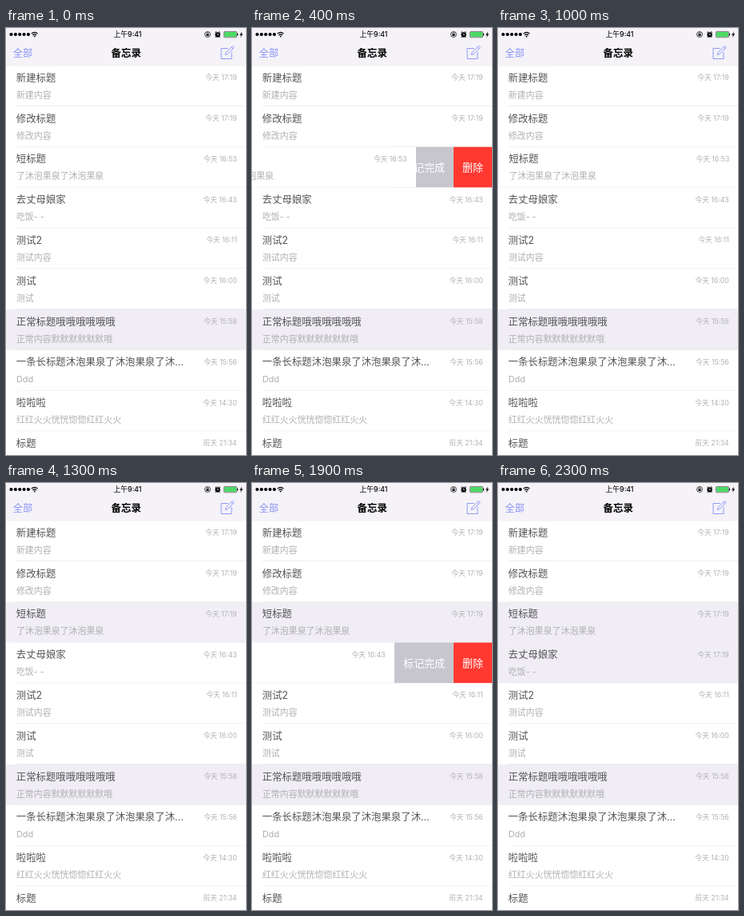
These frames come from a looping animation (300x534 px, 2400 ms). An HTML page:

```html
<!DOCTYPE html>
<html lang="zh-CN">
<head>
<meta charset="utf-8">
<title>备忘录</title>
<style>
  html, body { margin: 0; width: 100%; height: 100%; overflow: hidden; background: #fff; }
  svg { display: block; width: 100%; height: 100%; }
  text { font-family: Inter, "Noto Sans CJK SC", "Noto Sans CJK", sans-serif; }
  .title { font-size: 12.4px; fill: #555; }
  .body { font-size: 10.95px; fill: #b0b0b0; }
  .date { font-size: 8.7px; fill: #b2b2b2; text-anchor: end; }
  .button { font-size: 13px; fill: #fff; text-anchor: middle; }
  .icon { fill: none; stroke: #000; }
  .tint { fill: none; stroke: #8390f6; stroke-width: .9; }
</style>
</head>
<body>
<svg viewBox="0 0 300 534">
  <g id="list"></g>
  <rect width="300" height="47.7" fill="#f5f3f8"/>
  <g id="signal"></g>
  <g class="icon" stroke-width="1.2">
    <path d="M31.8 7.1Q35.7 3.5 39.6 7.1M33.4 9Q35.7 6.9 38 9"/>
    <circle cx="35.7" cy="10.4" r=".4"/>
  </g>
  <text x="152" y="11.3" font-size="8.8" font-weight="500" text-anchor="middle">上午9:41</text>
  <g class="icon" stroke-width=".7">
    <circle cx="252" cy="8" r="3.5"/>
    <path d="M250.9 7.6V6.8a1.1 1.1 0 0 1 2.2 0V7.6"/>
    <path d="M250.4 7.5h3.2v2.4h-3.2z" fill="#000" stroke="none"/>
    <circle cx="264.6" cy="8.4" r="2.9" fill="#000"/>
    <path d="M261.4 6l1.7-1.6M267.8 6l-1.7-1.6M262.8 10.6l-1 1.3M266.4 10.6l1 1.3" stroke-width="1"/>
    <path d="M264.6 6.8V8.6H266" stroke="#fff"/>
    <rect x="272.4" y="4.4" width="16.2" height="7.4" rx="1.3" stroke-width=".5"/>
    <rect x="273.1" y="5.1" width="14.8" height="6" rx=".6" fill="#4cd964" stroke="none"/>
    <path d="M289.5 6.8v2.6" stroke-width="1"/>
    <path d="M295 4.5l-3 4.2h1.9l-.9 3.3 3.2-4.4h-1.9z" fill="#000" stroke="none"/>
  </g>
  <text x="8.8" y="36" font-size="12.2" fill="#8793f7">全部</text>
  <text x="150.3" y="35.6" font-size="12.5" font-weight="700" text-anchor="middle">备忘录</text>
  <path class="tint" d="M277.5 25.5H269V38.5H282V30M274.3 33.5l.8-3L283.3 22.3l2 2L277.2 32.5zM281.7 24l2 2"/>
</svg>
<script>
const LOOP = 2400, TICK = 100, TOP = 47.2, ROW = 50.8;
const INK = "#e6e5e9", SHADE = "#f0edf5";

const notes = [
  ["新建标题", "新建内容", "今天 17:19"],
  ["修改标题", "修改内容", "今天 17:19"],
  ["短标题", "了沐泡果泉了沐泡果泉", "今天 16:53"],
  ["去丈母娘家", "吃饭- -", "今天 16:43"],
  ["测试2", "测试内容", "今天 16:11"],
  ["测试", "测试", "今天 16:00"],
  ["正常标题哦哦哦哦哦哦", "正常内容默默默默默默哦", "今天 15:58"],
  ["一条长标题沐泡果泉了沐泡果泉了沐...", "Ddd", "今天 15:56"],
  ["啦啦啦", "红红火火恍恍惚惚红红火火", "今天 14:30"],
  ["标题", "", "前天 21:34"],
];

// Per swiped row: first tick, offsets per tick, then fade-in of the done state.
const swipes = {
  2: { start: 3, slide: [-34, -95, -115, -121, -122, -122, -14, .6], fade: [.3, .65, .9, 1] },
  3: { start: 16, slide: [-63.5, -104, -118, -122, -14], fade: [.7, .9, 1] },
};

const rect = (x, y, w, h, fill, alpha = 1) =>
  `<rect x="${x}" y="${y}" width="${w}" height="${h}" fill="${fill}" opacity="${alpha}"/>`;
const text = (kind, x, y, str, alpha = 1) =>
  `<text class="${kind}" x="${x}" y="${y}" opacity="${alpha}">${str}</text>`;

function pose(i, tick) {
  const swipe = swipes[i];
  if (!swipe) return { x: 0, done: i === 6 ? 1 : 0 };
  const { start, slide, fade } = swipe, n = tick - start;
  if (n < 0) return { x: 0, done: 0 };
  if (n < slide.length) return { x: slide[n], done: 0 };
  return { x: 0, done: fade[Math.min(n - slide.length, fade.length - 1)] };
}

const buttons = () =>
  rect(178, 0, 74, ROW, "#c7c5cd") + rect(252, 0, 48, ROW, "#ff3830") +
  text("button", 215.3, 30, "标记完成") + text("button", 276, 30, "删除");

function row([title, body, date], i, tick) {
  const { x, done } = pose(i, tick);
  const fading = swipes[i] ? done : 0;
  const inset = x ? 0 : 13;
  return `<g transform="translate(0 ${TOP + ROW * i})">` +
    (x < 0 ? buttons() : "") +
    `<g transform="translate(${x})">` +
    rect(0, 0, 300, ROW, "#fff") + rect(0, 0, 300, ROW, SHADE, done) +
    (x > 0 ? rect(-1, 0, 1, ROW, INK) : "") +
    rect(inset, ROW - .7, 300 - inset, .7, INK) +
    text("title", 12.8, 19.5, title) + text("body", 12.9, 40.5, body) +
    text("date", 288.7, 18.1, date, 1 - fading) +
    (fading ? text("date", 288.7, 18.1, "今天 17:19", fading) : "") +
    "</g></g>";
}

const list = document.getElementById("list");
document.getElementById("signal").innerHTML =
  [0, 1, 2, 3, 4].map(k => `<circle cx="${6.5 + 5.35 * k}" cy="8" r="2.1"/>`).join("");

const begin = performance.now();
let shown = -1;
function draw() {
  const tick = Math.floor((performance.now() - begin) % LOOP / TICK);
  if (tick !== shown) {
    shown = tick;
    list.innerHTML = notes.map((note, i) => row(note, i, tick)).join("");
  }
  requestAnimationFrame(draw);
}
draw();
</script>
</body>
</html>
```
